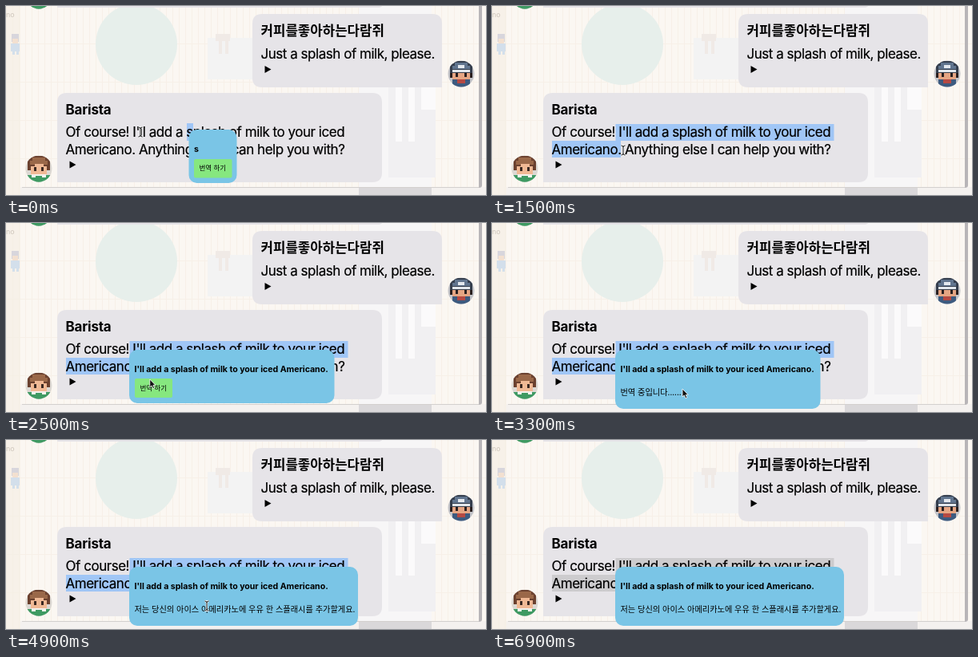
An HTML page for the animation above (7 s loop, 600 px wide and 237 px high).

```html
<!DOCTYPE html>
<html lang="ko">
<head>
<meta charset="utf-8">
<title>Chat translation</title>
<style>
  html, body { margin: 0; width: 100%; height: 100%; overflow: hidden; background: #fbf8f5; }
  svg { display: block; width: 600px; height: 237px; }
  text { font-family: Inter, "Noto Sans CJK KR", "Noto Sans CJK", sans-serif; fill: #000; }
  .chat { font-size: 17px; letter-spacing: -.47px; stroke: #000; stroke-width: .2px; }
  .who { font-size: 17px; font-weight: 700; letter-spacing: -.2px; }
  .ko { font-family: "Noto Sans CJK KR", "Noto Sans CJK", sans-serif; font-size: 10.2px; }
  .ko.name { font-size: 16.8px; font-weight: 700; }
  .ko.act { font-size: 8.5px; }
  .pick { font-size: 10.6px; font-weight: 700; letter-spacing: -.02px; }
  .bubble { fill: #e6e4e8; }
  .pop { fill: #7ac5e6; }
  .btn { fill: #86e77f; }
  .px { shape-rendering: crispEdges; }
</style>
</head>
<body>
<svg viewBox="0 0 600 237">
  <defs>
    <clipPath id="round"><circle r="16.5"/></clipPath>
    <pattern id="planks" width="8" height="48" patternUnits="userSpaceOnUse">
      <path fill="#fbf7f2" d="M0 0H8V48H0z"/>
      <path stroke="#f7f0e8" d="M.5 0V48M0 47.5H8"/>
    </pattern>
    <g id="clerk" clip-path="url(#round)">
      <circle r="17" fill="#dcd8d3"/>
      <g class="px">
        <path fill="#3f9a63" d="M-17 8H17V17H-17z"/>
        <path fill="#6b412f" d="M-10-16H10V-13H14V2H-14V-13H-10z"/>
        <path fill="#9a6849" d="M-8-14H8V-10H11V-5H-11V-10H-8z"/>
        <path fill="#f0b995" d="M-10-3H-5V-6H6V-3H10V7H-10z"/>
        <path fill="#3a2822" d="M-6-2H-3V3H-6zM3-2H6V3H3z"/>
        <path fill="#f3f2ee" d="M-9 7H9V11H-9z"/>
        <path fill="#3f9a63" d="M-4 9H4V17H-4z"/>
      </g>
    </g>
    <g id="guest" clip-path="url(#round)">
      <circle r="17" fill="#c3c4c9"/>
      <g class="px">
        <path fill="#353e4d" d="M-9-16H9V-13H14V-1H-14V-13H-9z"/>
        <path fill="#61758f" d="M-8-14H8V-10H11V-6H-11V-10H-8z"/>
        <path fill="#e3e8ee" d="M-4-11H4V-7H-4zM-11-5H11V-2H-11z"/>
        <path fill="#e5a583" d="M-11-1H11V7H-11z"/>
        <path fill="#2a2020" d="M-7-1H-4V4H-7zM4-1H7V4H4zM-14-1H-11V5H-14zM11-1H14V5H11z"/>
        <path fill="#3d5b80" d="M-11 7H11V17H-11z"/>
        <path fill="#b64a43" d="M-5 7H5V12H-5z"/>
      </g>
    </g>
  </defs>

  <g id="room">
    <path fill="url(#planks)" d="M0 0H600V237H0z"/>
    <path fill="#f6eee5" fill-opacity=".6" d="M0 0H18V237H0z"/>
    <path fill="#f4f1ef" d="M18 227H600V237H18z"/>
    <path fill="#f7f6f7" d="M441 0H532V227H441z"/>
    <path fill="#dad8da" d="M441 227H532V237H441z"/>
    <path fill="#f1f0f2" d="M478 102H537V215H478z"/>
    <path fill="#fbfafb" d="M487 102H495V170H487zM503 102H511V170H503zM519 102H537V130H519z"/>
    <path fill="#f3f3f3" d="M252 40H308V92H252z"/>
    <path fill="#f0eae6" d="M262 35H280V44H262zM266 44H270V60H266zM274 44H278V60H274z"/>
    <circle cx="163" cy="48" r="51" fill="#e7efeb"/>
    <path stroke="#d3d0ce" d="M20 227.5H591"/>
    <path fill="#b8b5b8" d="M591 0H595V225Q595 228 591 228z"/>
    <text x="0" y="14" font-size="9" style="fill:#cfc7bd">no</text>
    <path class="px" fill="#d8d6dc" d="M7 35H16V45H7z"/>
    <path class="px" fill="#f3e0d0" d="M8 41H15V47H8z"/>
    <path class="px" fill="#d3dfeb" d="M6 47H17V57H6zM8 57H11V61H8zM13 57H16V61H13z"/>
  </g>

  <path class="bubble" d="M64 0H470Q469 2 464 2H64z"/>
  <use href="#clerk" x="41" y="-13"/>
  <path class="bubble" d="M320 10H533Q545 10 545 22V102H320Q308 102 308 90V22Q308 10 320 10z"/>
  <path class="bubble" d="M76 109H458Q470 109 470 121V209Q470 221 458 221H64V121Q64 109 76 109z"/>
  <use href="#guest" x="569" y="85"/>
  <use href="#clerk" x="41" y="204"/>

  <path id="sel"/>

  <text class="ko name" x="318.5" y="36.5">커피를좋아하는다람쥐</text>
  <text class="chat" x="318.5" y="66">Just a splash of milk, please.</text>
  <text class="who" x="74.5" y="136">Barista</text>
  <text class="chat" x="74.5" y="164">Of course! I'll add a splash of milk to your iced</text>
  <text class="chat" x="74.5" y="185.5">Americano. Anything else I can help you with?</text>
  <path d="M323.5 75L331.5 79.5L323.5 84zM79.5 194.5L87.5 199L79.5 203.5z"/>

  <g id="letter">
    <rect class="pop" x="228.5" y="155" width="60" height="67" rx="10"/>
    <text class="pick" x="235" y="183">s</text>
    <rect class="btn" x="235" y="192" width="47.5" height="23.5" rx="2"/>
    <text class="ko act" x="241.5" y="206.3">번역 하기</text>
  </g>

  <g id="phrase">
    <rect id="card" class="pop" x="154" y="159" rx="10"/>
    <text class="pick" x="160.5" y="187">I'll add a splash of milk to your iced Americano.</text>
    <g id="ask">
      <rect class="btn" x="161" y="195" width="47" height="24" rx="2"/>
      <text class="ko act" x="167.5" y="210.3">번역 하기</text>
    </g>
    <text id="answer" class="ko" x="160.5" y="215.8"></text>
  </g>

  <g id="cursor">
    <g id="beam" fill="none">
      <path stroke="#fff" stroke-width="2.4" d="M-2.5-6Q0-6 0-4Q0-6 2.5-6M0-4V4M-2.5 6Q0 6 0 4Q0 6 2.5 6"/>
      <path stroke="#111" d="M-2.5-6Q0-6 0-4Q0-6 2.5-6M0-4V4M-2.5 6Q0 6 0 4Q0 6 2.5 6"/>
    </g>
    <path id="arrow" fill="#111" stroke="#fff" stroke-width=".8" d="M-2-6V4L.3 2L2 5.8L3.8 5L2.2 1.4H5.2z"/>
  </g>
</svg>
<script>
  const LOOP = 7000, STEP = 100;
  const AT = { clear: 300, drag: 400, drop: 1500, open: 1700, click: 2900, reply: 3800, leave: 5600, blur: 6500 };

  // time, x, y of the pointer
  const route = [
    [0, 168, 158], [200, 160, 158], [400, 155, 159], [700, 172, 166],
    [900, 186, 173], [1200, 172, 180], [1500, 164, 181], [1900, 168, 182],
    [2200, 172, 190], [2600, 185, 206], [2900, 186, 207], [3300, 240, 214],
    [3900, 244, 213], [4400, 251, 208], [7000, 251, 208]
  ];
  const $ = id => document.getElementById(id);
  const show = (id, on) => $(id).style.display = on ? "" : "none";
  const box = (x1, y1, x2, y2) => `M${x1} ${y1}H${x2}V${y2}H${x1}z`;

  function pointer(t) {
    const i = route.findIndex(p => p[0] > t);
    const [a, b] = [route[i - 1], route[i]];
    const k = (t - a[0]) / (b[0] - a[0]);
    return [a[1] + (b[1] - a[1]) * k, a[2] + (b[2] - a[2]) * k];
  }

  function selection(t, x, y) {
    if (t < AT.clear) return box(226, 147, 234, 169);
    if (t < AT.drag) return "";
    if (t < AT.drop && y < 169) return box(154.5, 148, Math.max(154.5, x), 169);
    const end = t < AT.drop ? Math.max(161, x) : 161;
    return box(154.5, 148, 427.5, 169) + box(75, 169, end, 190);
  }

  function draw(t) {
    const [x, y] = pointer(t);
    const waiting = t < AT.click, done = t >= AT.reply;

    $("sel").setAttribute("d", selection(t, x, y));
    $("sel").setAttribute("fill", t < AT.blur ? "#a0c6f6" : "#cdccce");

    show("letter", t < AT.clear);
    show("phrase", t >= AT.open);
    show("ask", waiting);
    $("card").setAttribute("width", done ? 286 : 256.5);
    $("card").setAttribute("height", waiting ? 67 : 74);
    $("answer").textContent = waiting ? "" : done
      ? "저는 당신의 아이스 아메리카노에 우유 한 스플래시를 추가할게요."
      : "번역 중입니다......";

    const arrow = t >= 2300 && t < 4000;
    show("cursor", t < AT.leave);
    show("arrow", arrow);
    show("beam", !arrow);
    $("cursor").setAttribute("transform", `translate(${x} ${y})`);
  }

  function tick() {
    draw(Math.floor(performance.now() % LOOP / STEP) * STEP);
    requestAnimationFrame(tick);
  }
  tick();
</script>
</body>
</html>
```
